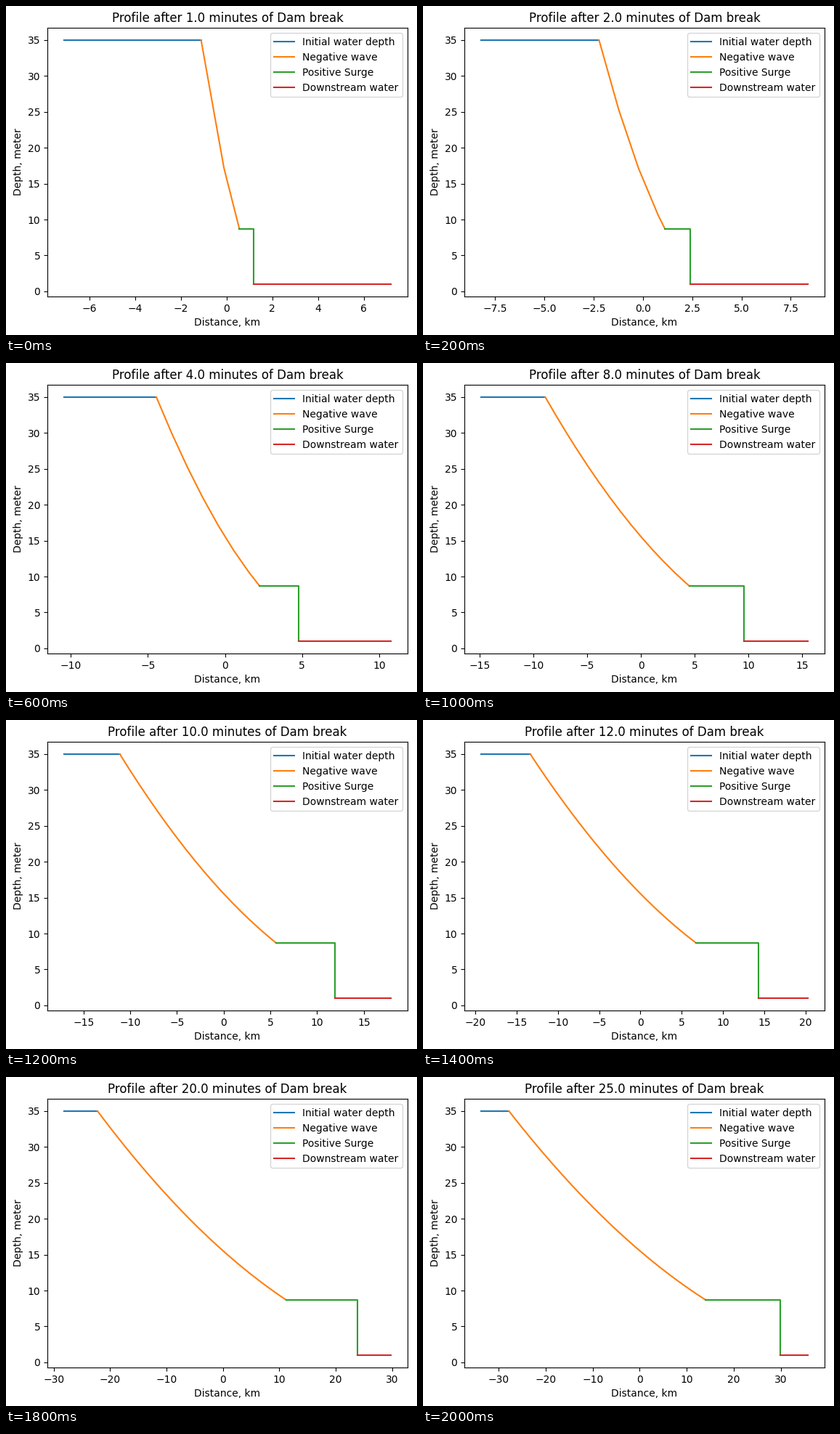
Recreate the animation shown at these times as a matplotlib script. Size 566 by 453 pixels, loop 2.2 s.

```python
import numpy as np
import matplotlib.pyplot as plt
from matplotlib.animation import FuncAnimation

W, H, DPI = 566, 453, 100
G = 9.81
UPSTREAM, DOWNSTREAM = 35.0, 1.0   # still water depths, m
SURGE_DEPTH = 8.7                  # m
SURGE_SPEED = 19.88                # m/s
REACH = 6.0                        # still water shown on each side, km
MINUTES = [1, 2, 3, 4, 6, 8, 10, 12, 15, 20, 25]

C0 = np.sqrt(G * UPSTREAM)
C2 = np.sqrt(G * SURGE_DEPTH)

plt.rcParams["font.family"] = "DejaVu Sans"
fig = plt.figure(figsize=(W / DPI, H / DPI), dpi=DPI)
ax = fig.add_axes([57.0 / W, 53.2 / H, 496 / W, 369.6 / H])


def wave_depth(x, secs):
    """Depth on the negative wave at x km, secs after the break."""
    return (2 * C0 - 1000 * x / secs) ** 2 / (9 * G)


def draw(i):
    secs = MINUTES[i] * 60
    head = -C0 * secs / 1000
    foot = (2 * C0 - 3 * C2) * secs / 1000
    front = SURGE_SPEED * secs / 1000
    # the wave is sampled once per kilometre
    x = np.append(np.arange(head, foot, 1.0), foot)

    ax.clear()
    ax.plot([head - REACH, head], [UPSTREAM] * 2, label="Initial water depth")
    ax.plot(x, wave_depth(x, secs), label="Negative wave")
    ax.plot([foot, front, front], [SURGE_DEPTH, SURGE_DEPTH, DOWNSTREAM],
            label="Positive Surge")
    ax.plot([front, front + REACH], [DOWNSTREAM] * 2, label="Downstream water")
    ax.set_title(f"Profile after {MINUTES[i]:.1f} minutes of Dam break")
    ax.set_xlabel("Distance, km")
    ax.set_ylabel("Depth, meter")
    ax.legend(loc="upper right")
    return ax.get_children()


anim = FuncAnimation(fig, draw, frames=len(MINUTES), init_func=lambda: draw(0),
                     interval=200, repeat=True, repeat_delay=0)
plt.show()
```
